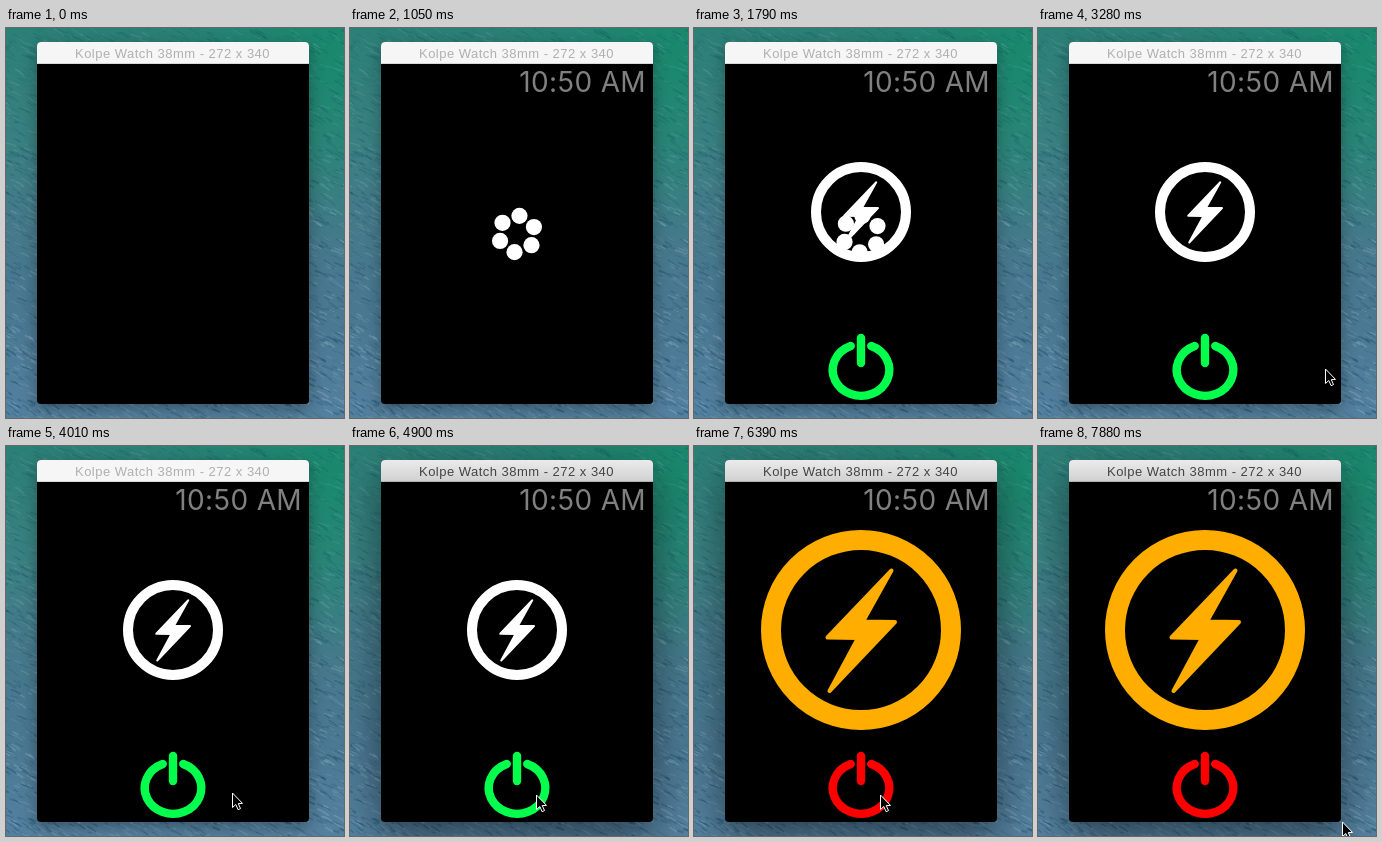
An HTML page with a canvas for the animation above (8 s loop, 338 by 390 pixels).

```html
<!DOCTYPE html>
<html lang="en">
<head>
<meta charset="utf-8">
<title>Watch simulator</title>
<style>
html, body { margin: 0; height: 100%; overflow: hidden; }
canvas { display: block; }
</style>
</head>
<body>
<canvas id="stage" width="338" height="390"></canvas>
<script>
const W = 338, H = 390, LOOP = 8000, TAU = Math.PI * 2;
const ctx = document.getElementById('stage').getContext('2d');
const sea = paintSea();

// Index of the held step when `count` steps run from `start` to `end`.
function stepIndex(t, start, end, count) {
  const i = Math.floor((t - start) / (end - start) * (count - 1) + 1e-6);
  return Math.min(count - 1, i);
}

function gradient(g, stops, ...line) {
  const fill = line.length === 4 ? g.createLinearGradient(...line) : g.createRadialGradient(...line);
  stops.forEach(([at, color]) => fill.addColorStop(at, color));
  return fill;
}

function paintSea() {
  const canvas = document.createElement('canvas');
  canvas.width = W;
  canvas.height = H;
  const g = canvas.getContext('2d');
  let seed = 11;
  const rand = () => (seed = seed * 16807 % 2147483647) / 2147483647;

  g.fillStyle = gradient(g, [[0, '#2b8076'], [.3, '#3a8082'], [.5, '#45798a'], [.75, '#4a7892'], [1, '#54809f']], 0, 0, 0, H);
  g.fillRect(0, 0, W, H);
  g.fillStyle = gradient(g, [[0, 'rgba(18,140,105,.75)'], [1, 'rgba(18,140,105,0)']], W, 30, 0, W, 30, 190);
  g.fillRect(0, 0, W, H);

  for (let i = 0; i < 3600; i++) {
    const x = rand() * (W + 10) - 10, y = rand() * H;
    const len = 3 + rand() * 9, slope = .3 + rand() * .45;
    const light = rand() < .35 + .15 * y / H;
    const alpha = (.1 + rand() * .22) * (.5 + .6 * y / H);
    g.strokeStyle = `rgba(${light ? '165,198,208' : '10,58,84'},${alpha})`;
    g.lineWidth = .6 + rand() * 1.3;
    g.beginPath();
    g.moveTo(x, y);
    g.quadraticCurveTo(x + len / 2, y + len * slope * .3, x + len, y + len * slope);
    g.stroke();
  }
  return canvas;
}

function drawWindow(active) {
  ctx.save();
  ctx.shadowColor = active ? 'rgba(0,0,0,.5)' : 'rgba(0,0,0,.33)';
  ctx.shadowBlur = active ? 40 : 16;
  ctx.shadowOffsetY = active ? 14 : 5;
  ctx.fillStyle = '#000';
  ctx.beginPath();
  ctx.roundRect(31, 14, 272, 362, 4);
  ctx.fill();
  ctx.restore();

  ctx.fillStyle = active ? gradient(ctx, [[0, '#ebebeb'], [1, '#d0d0d0']], 0, 14, 0, 36) : '#f6f6f6';
  ctx.beginPath();
  ctx.roundRect(31, 14, 272, 22, [4, 4, 0, 0]);
  ctx.fill();
  ctx.fillStyle = active ? '#b4b4b4' : '#d8d8d8';
  ctx.fillRect(31, 35, 272, 1);

  ctx.fillStyle = active ? '#444' : '#b0b0b0';
  ctx.font = '13px "Liberation Sans", Arial, sans-serif';
  ctx.textAlign = 'center';
  ctx.letterSpacing = '.48px';
  ctx.fillText('Kolpe Watch 38mm - 272 x 340', 166.5, 30);
}

function drawClock() {
  ctx.fillStyle = '#808080';
  ctx.font = '28px Inter, sans-serif';
  ctx.textAlign = 'right';
  ctx.letterSpacing = '.35px';
  ctx.fillText('10:50 AM', 296, 64);
}

function drawBolt(scale, color) {
  ctx.save();
  ctx.translate(167, 184);
  ctx.scale(scale, scale);
  ctx.fillStyle = ctx.strokeStyle = color;
  ctx.lineWidth = 20;
  ctx.beginPath();
  ctx.arc(0, 0, 90, 0, TAU);
  ctx.stroke();

  ctx.lineWidth = 4;
  ctx.lineJoin = 'round';
  ctx.beginPath();
  [[30.5, -59.5], [-33.5, 7.5], [-3, 8], [-31.5, 61], [34, -8], [2, -8.5]].forEach(p => ctx.lineTo(...p));
  ctx.closePath();
  ctx.fill();
  ctx.stroke();
  ctx.restore();
}

function drawPower(color, alpha) {
  ctx.save();
  ctx.globalAlpha = alpha;
  ctx.strokeStyle = color;
  ctx.lineWidth = 8.4;
  ctx.lineCap = 'round';
  const gap = .37, top = -Math.PI / 2;
  ctx.beginPath();
  ctx.ellipse(167, 342, 28.3, 25.8, 0, top + gap, top + TAU - gap);
  ctx.moveTo(167, 310);
  ctx.lineTo(167, 335);
  ctx.stroke();
  ctx.restore();
}

function drawSpinner(t) {
  const at = 900 + stepIndex(t, 900, 1930, 8) * 1030 / 7;
  const turn = (24 + (at - 1490) * .24) * TAU / 360;
  ctx.fillStyle = '#fff';
  for (let i = 0; i < 6; i++) {
    const a = turn + i * TAU / 6;
    ctx.beginPath();
    ctx.arc(167 + 18.3 * Math.cos(a), 206 + 18.3 * Math.sin(a), 8.1, 0, TAU);
    ctx.fill();
  }
}

function cursorAt(t) {
  if (t < 4450) {
    const i = stepIndex(t, 3280, 4300, 8);
    return [[287, 275, 263, 251, 239, 226, 207, 193][i], 341 + Math.min(8, i * 1.2)];
  }
  if (t < 4600) return [189, 349];
  if (t < 6990) return [186, 349];
  const p = (stepIndex(t, 6990, 7880, 7) + 1) / 7;
  const e = p * p * (3 - 2 * p);
  return [186 + 118 * e, 349 + 27 * e];
}

function drawCursor([x, y]) {
  ctx.save();
  ctx.translate(x + .5, y);
  ctx.fillStyle = '#000';
  ctx.strokeStyle = '#fff';
  ctx.lineWidth = 1;
  ctx.lineJoin = 'miter';
  ctx.beginPath();
  [[0, 0], [0, 14.5], [3.3, 11.5], [5.6, 16.7], [8, 15.6], [5.8, 10.6], [10, 10.4]].forEach(p => ctx.lineTo(...p));
  ctx.closePath();
  ctx.fill();
  ctx.stroke();
  ctx.restore();
}

function draw(t) {
  const on = t >= 6390;
  const pressed = t >= 5950 && t < 6090;
  ctx.drawImage(sea, 0, 0);
  drawWindow(t >= 4900);
  if (t >= 900) drawClock();
  if (t >= 1790) {
    drawBolt(on ? 1 : .5, on ? '#ffae00' : '#fff');
    drawPower(on ? '#f00' : '#04ff4c', pressed ? .5 : 1);
  }
  if (t >= 900 && t < 2080) drawSpinner(t);
  if (t >= 3280) drawCursor(cursorAt(t));
}

const start = performance.now();
function tick() {
  draw((performance.now() - start) % LOOP);
  requestAnimationFrame(tick);
}
tick();
</script>
</body>
</html>
```
